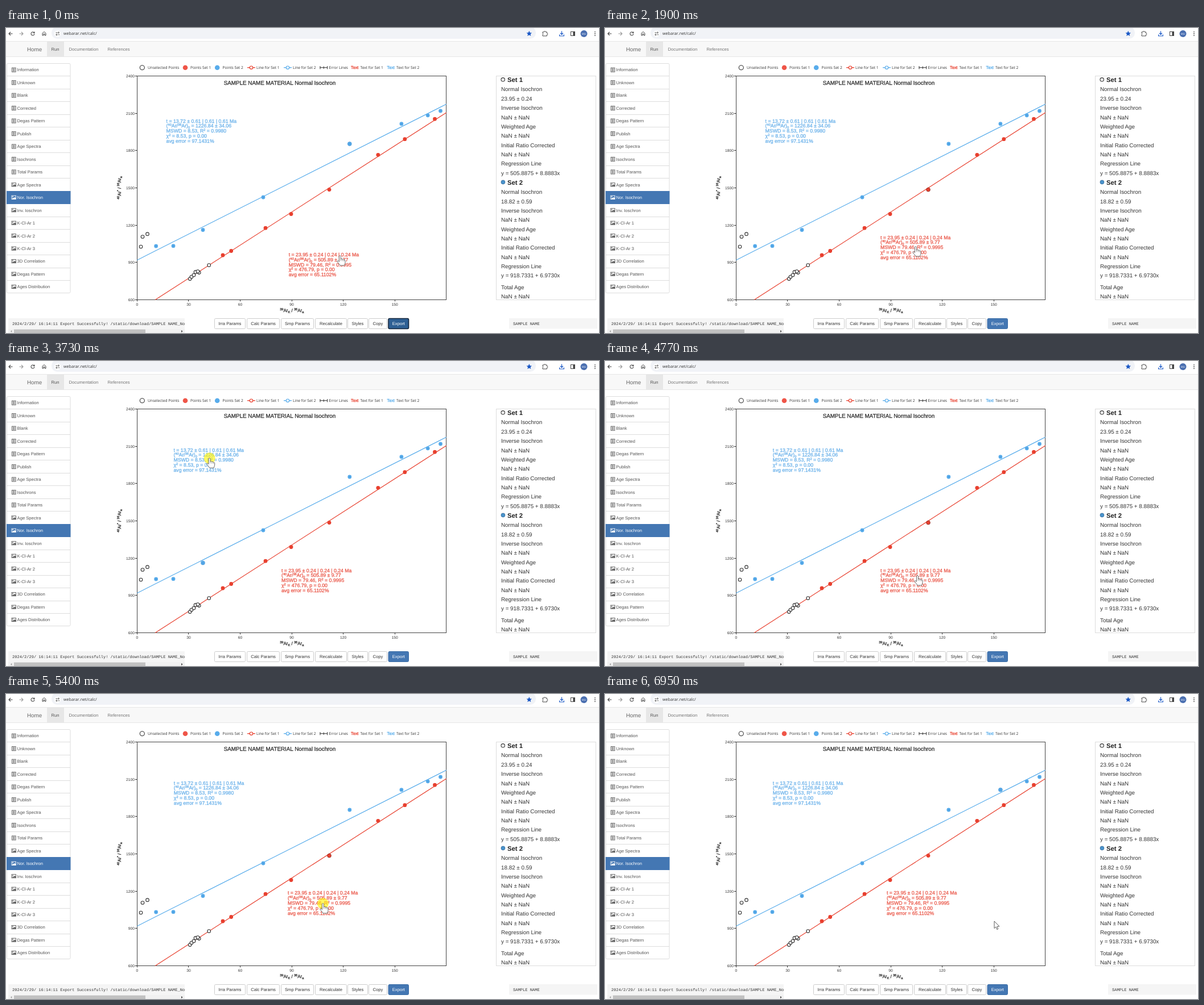
These frames come from a looping animation (1042x537 px, 8 s). An HTML page:

```html
<!DOCTYPE html>
<html lang="en">
<head>
<meta charset="utf-8">
<title>Normal isochron</title>
<style>
html, body { margin: 0; width: 100%; height: 100%; overflow: hidden; background: #fff; }
svg { display: block; width: 1042px; height: 537px; font-family: "Liberation Sans", Arial, sans-serif; }
text { white-space: pre; text-rendering: geometricPrecision; }
.ui { font-family: "Open Sans", "Noto Sans", sans-serif; }
.mono { font-family: "Liberation Mono", monospace; }
</style>
</head>
<body>
<svg id="stage" viewBox="0 0 1042 537"></svg>
<script>
const RED = '#e8402f', BLUE = '#58aceb', INK = '#333';
const LOOP = 8000;

// {^x} raises, {_x} lowers
const rich = (s, small) => s.replace(/\{([\^_])(.+?)\}/g, (m, k, v) =>
  `<tspan font-size="${small}" baseline-shift="${k === '^' ? 2.7 : -1.5}">${v}</tspan>`);
const text = (x, y, s, size = 7.63, fill = INK, more = '') =>
  `<text x="${x}" y="${y + size * 0.355}" font-size="${size}" fill="${fill}" ${more}>${rich(s, 5.7)}</text>`;
const rect = (x, y, w, h, fill, stroke = 'none', more = '') =>
  `<rect x="${x}" y="${y}" width="${w}" height="${h}" fill="${fill}" stroke="${stroke}" ${more}/>`;
const path = (d, stroke = INK, w = 1, fill = 'none', more = '') =>
  `<path d="${d}" stroke="${stroke}" stroke-width="${w}" fill="${fill}" ${more}/>`;
const dot = (x, y, r, fill, stroke = 'none', w = 1, more = '') =>
  `<circle cx="${x}" cy="${y}" r="${r}" fill="${fill}" stroke="${stroke}" stroke-width="${w}" ${more}/>`;
const bold = c => `stroke="${c}" stroke-width=".3"`;
const mid = 'text-anchor="middle"';

function browserBar() {
  const c = '#474747';
  return rect(80, -2, 851, 21, '#f1f3f7', 'none', 'rx="10"') +
    path('M11.5 10H5M8 7L5 10L8 13', c, 1.1) +
    path('M23.5 10H30M27 7L30 10L27 13', '#999', 1.1) +
    path('M49.4 8.2A3 3 0 1 0 50 10.4M50 6.6V8.7H47.8', c, 1.1) +
    path('M64 9.2L67 6.6L70 9.2V13H68V10.5H66V13H64Z', c, 1) +
    dot(90.5, 10, 5.5, '#fff') +
    path('M87.5 8.2H90M92 11.8H94', c, 1) + dot(92.3, 8.2, 1.1, 'none', c, .9) + dot(89, 11.8, 1.1, 'none', c, .9) +
    text(101, 9.8, 'webarar.net/calc/', 7.2, '#333', 'class="ui"') +
    path('M919.3 5L920.7 8.2L924 8.5L921.5 10.7L922.3 14L919.3 12.2L916.3 14L917.1 10.7L914.6 8.5L917.9 8.2Z', 'none', 0, '#1a58c6') +
    path('M943 7H945.6A1.3 1.3 0 0 1 948.2 7H950.5V9.2A1.3 1.3 0 0 1 950.5 11.8V14H943V11.6A1.2 1.2 0 0 0 943 9.3Z', c, 1) +
    path('M976.5 5.5V11.2M974 9L976.5 11.5L979 9M972.6 11.5V14H980.4V11.5', '#1a58c6', 1.2) +
    rect(992.5, 6.5, 7, 7, '#fff', c) + rect(996.4, 6.5, 3.2, 7, c) +
    dot(1015.5, 10, 6, '#4a6fb0') + text(1015.5, 10, 'MU', 4.8, '#e9eefa', mid) +
    [6.8, 10, 13.2].map(y => dot(1035, y, .9, c)).join('');
}

function navBar() {
  return rect(-2, 23.5, 1046, 27, '#f8f8f8', '#e7e7e7') + rect(72, 24, 30, 26.5, '#e7e7e7') +
    text(37, 37.2, 'Home', 9.8, '#666') + text(79.5, 37.2, 'Run', 7.63, '#555') +
    text(110.5, 37.2, 'Documentation', 7.7, '#777') + text(178.5, 37.2, 'References', 7.63, '#777');
}

function sideMenu() {
  const names = ['Information', 'Unknown', 'Blank', 'Corrected', 'Degas Pattern', 'Publish', 'Age Spectra',
    'Isochrons', 'Total Params', 'Age Spectra', 'Nor. Isochron', 'Inv. Ioschron', 'K-Cl-Ar 1', 'K-Cl-Ar 2',
    'K-Cl-Ar 3', '3D Correlation', 'Degas Pattern', 'Ages Distribution'];
  const active = 10, midY = i => 73.7 + i * 22.47;
  let out = rect(1.5, 62.5, 111.5, 404, '#fff', '#ddd', 'rx="2"');
  for (let i = 1; i < names.length; i++) out += path(`M1.5 ${Math.round(midY(i) - 11.7) + .5}H113`, '#ddd');
  out += rect(1, 287, 112.5, 23, '#4477b3');
  names.forEach((name, i) => {
    const y = midY(i), c = i === active ? '#fff' : '#555';
    out += i < 9
      ? rect(10.5, y - 3.6, 6.6, 7.2, 'none', c, 'stroke-width=".9"') +
        path(`M12 ${y - 1.8}H16M12 ${y}H16M12 ${y + 1.8}H16M13 ${y - 3}V${y + 3}`, c, .7)
      : rect(10, y - 3.2, 7.4, 6.2, 'none', c, 'stroke-width=".9"') + dot(12, y - 1.3, .9, c) +
        path(`M10.5 ${y + 2.5}L12.6 ${y + .3}L13.6 ${y + 1.2}L15.4 ${y - 1}L17 ${y + 1}V${y + 2.5}Z`, 'none', 0, c);
    out += text(19.6, y, name, 7.63, c);
  });
  return out;
}

function legend() {
  const item = (x, s) => text(x, 69.8, s, 6.65, INK, 'class="ui"');
  const lineKey = (x, c) => path(`M${x} 69.7h14`, c, 1.3) + dot(x + 7, 69.7, 2.7, '#fff', c, 1.2);
  return dot(239.3, 69.7, 4, '#fff', '#333', 1.1) + item(249, 'Unselected Points') +
    dot(315, 69.7, 4.3, '#ef5548') + item(324, 'Points Set 1') +
    dot(371.2, 69.7, 4.3, BLUE) + item(380.5, 'Points Set 2') +
    lineKey(424, RED) + item(440, 'Line for Set 1') +
    lineKey(488, BLUE) + item(504, 'Line for Set 2') +
    path('M551.5 69.7h13.5M552 67v5.4M564.6 67v5.4M558.3 67.5v4.4', '#333', 1) + item(567.5, 'Error Lines') +
    text(606, 69.6, 'Text', 7.3, RED, bold(RED)) + item(622.5, 'Text for Set 1') +
    text(669.5, 69.6, 'Text', 7.3, BLUE, bold(BLUE)) + item(686, 'Text for Set 2');
}

const open = [[237, 385], [240, 367.5], [248.5, 362.7], [323.2, 441.6], [326, 438], [330, 435], [333, 429.7],
  [339.2, 430.6], [337, 428.5], [356.7, 417.5]];
const red = [[381, 400], [395.7, 392.5], [456, 352.2], [501, 327.5], [568, 284.6], [653.8, 223.3], [700.8, 195.7], [753.5, 160.2]];
const blue = [[263.6, 384], [294, 383.7], [346, 355.5], [452, 298], [603.8, 204], [694.9, 168.7], [741.2, 153.8], [763.5, 146]];

function chart() {
  const px = v => 230.3 + v * 3.0195, py = v => 478.4 - (v - 600) * .2188;
  const rule = (a, b, from, c) => path(`M${px(from)} ${py(a + b * from)}L${px(180)} ${py(a + b * 180)}`, c, 1.2);
  const title = mid + ' ' + bold(INK);
  let out = rect(230.5, 84.5, 543, 394, '#fff', '#444');
  for (let v = 600; v <= 2400; v += 300) {
    const y = py(v);
    out += path(`M227 ${Math.floor(y) + .5}h3`, '#333') + text(226, y + .2, String(v), 6.7, INK, 'text-anchor="end"');
  }
  for (let v = 0; v <= 150; v += 30) {
    const x = px(v);
    out += path(`M${Math.floor(x) + .5} 478v3.5`, '#333') + text(x, 487, String(v), 6.7, INK, mid);
  }
  out += text(481, 97, 'SAMPLE NAME MATERIAL Normal Isochron', 9.84, INK, title) +
    text(502.3, 496.7, '{^39}Ar{_K} / {^36}Ar{_a}', 8, INK, title) +
    `<g transform="translate(199 281.5) rotate(-90)">${text(0, 0, '{^40}Ar{^*} / {^36}Ar{_a}', 8, INK, title)}</g>`;
  out += rule(918.7331, 6.973, 0, BLUE) + rule(505.8875, 8.8883, 10.59, RED);
  out += open.map(p => dot(...p, 2.8, '#fff', '#333', 1.1)).join('');
  out += blue.map(p => dot(...p, 3.4, BLUE, 'none', .8, 'class="pt"') + dot(...p, 1, '#4594d8')).join('');
  out += red.map(p => dot(...p, 3.4, RED, 'none', .8, 'class="pt"')).join('');
  return out;
}

const note = (id, c, lines) => `<g id="${id}">` +
  lines.map((s, i) => text(0, i * 8.78, s, 8.72, c, bold(c))).join('') + '</g>';

function resultPanel() {
  const set = (a, b) => ['Normal Isochron', a, 'Inverse Isochron', 'NaN ± NaN', 'Weighted Age', 'NaN ± NaN',
    'Initial Ratio Corrected', 'NaN ± NaN', 'Regression Line', b];
  const block = (y, title, rows) => text(881, y, title, 11.3, '#222', 'font-weight="bold"') +
    rows.map((s, i) => text(870, y + 17.2 + i * 16.35, s, 9.84)).join('');
  return rect(861.5, 84.5, 175, 394, '#fff', '#ddd') +
    dot(873.2, 90.8, 3.2, '#fff', '#333', 1.1) +
    block(90.8, 'Set 1', set('23.95 ± 0.24', 'y = 505.8875 + 8.8883x')) +
    dot(873.4, 271.4, 3.4, BLUE, '#2d5f8c', .9) + dot(873.4, 271.4, 1.6, 'none', '#2d5f8c', .7) +
    block(271.5, 'Set 2', set('18.82 ± 0.59', 'y = 918.7331 + 6.9730x')) +
    text(870, 457, 'Total Age', 9.84) + text(870, 473, 'NaN ± NaN', 9.84);
}

function footer() {
  const buttons = [[366.5, 54, 'Irra Params'], [423.5, 57, 'Calc Params'], [483.5, 57, 'Smp Params'],
    [543.5, 55, 'Recalculate'], [600.5, 35, 'Styles'], [637.5, 32, 'Copy']];
  return rect(4, 511, 310, 27, '#f5f5f5') +
    '<svg x="4" y="511" width="310" height="19" viewBox="4 511 310 19" style="width:310px;height:19px">' +
    text(11, 520.3, '2024/2/29/ 16:14:11 Export Successfully! /static/download/SAMPLE NAME_Normal', 7.02, INK, 'class="mono"') + '</svg>' +
    rect(4, 530, 310, 8, '#f1f1f1') + rect(14, 530.7, 231, 6.3, '#c1c1c1') +
    path('M10.3 532L8 534L10.3 536Z', 'none', 0, '#999') + path('M308 532L310.6 534L308 536Z', 'none', 0, '#444') +
    rect(884, 511, 155, 18.5, '#f5f5f5') + text(891, 520.3, 'SAMPLE NAME', 7.1, INK, 'class="mono"') +
    buttons.map(([x, w, s]) => rect(x, 511.5, w, 18, '#fff', '#ccc', 'rx="2"') +
      text(x + w / 2, 520.6, s, 7.63, INK, mid)).join('') +
    rect(672, 511.5, 35.5, 18, '#4477b3', '#3c6da6', 'rx="2" id="export"') +
    text(689.8, 520.6, 'Export', 7.63, '#fff', mid);
}

const hand = 'M-1.6 1.2C-1.6-.8 1.4-.8 1.4 1.2V6C2 5 4 5 4.2 6.6C5 5.6 6.6 6 6.8 7.4C7.8 6.8 9 7.4 9 8.6V12' +
  'C9 14 7.8 15 7.5 17H-.2C-.8 14.8-3.4 12.8-4.8 10.4C-5.4 9-3.8 8.2-2.8 9.2L-1.6 10.4Z';
const arrow = 'M0 0V12.6L2.8 10L4.8 14.6L6.8 13.7L4.9 9.3L8.9 9.1Z';

const stage = document.getElementById('stage');
stage.innerHTML = rect(0, 0, 1042, 537, '#fff') + browserBar() + navBar() + sideMenu() + legend() + chart() +
  note('blueNote', '#6cb2ea', ['t = 13.72 ± 0.61 | 0.61 | 0.61 Ma', '({^40}Ar/{^36}Ar){_0} = 1226.84 ± 34.06',
    'MSWD = 8.53, R{^2} = 0.9980', 'χ{^2} = 8.53, p = 0.00', 'avg error = 97.1431%']) +
  note('redNote', '#ea5a4c', ['t = 23.95 ± 0.24 | 0.24 | 0.24 Ma', '({^40}Ar/{^36}Ar){_0} = 505.89 ± 9.77',
    'MSWD = 79.46, R{^2} = 0.9995', 'χ{^2} = 476.79, p = 0.00', 'avg error = 65.1102%']) +
  resultPanel() + footer() +
  '<g id="mouse">' + dot(0, 0, 10, '#fff200', 'none', 1, 'id="press" fill-opacity=".62"') +
  path(hand, '#444', .8, '#fff', 'id="hand" stroke-linejoin="round"') +
  path('M1.4 6V9M4.2 7V9.4M6.8 8V9.8', '#666', .7, 'none', 'id="creases"') +
  path(arrow, '#333', .8, '#fff', 'id="arrow"') + '</g>';

// [time, x, y]
const mouseKeys = [[30, 587, 401], [290, 545, 408], [720, 545, 408], [930, 546, 393], [1140, 546, 385],
  [2070, 546, 385], [2650, 345, 178], [3160, 345, 178], [3330, 352, 174], [3500, 352, 174], [3770, 358, 171],
  [4140, 358, 171], [4770, 549, 378], [4930, 546, 386], [4970, 546, 386], [5400, 557, 369],
  [5720, 557, 369], [6410, 673, 399], [6580, 673, 399], [6950, 684, 400]];
const redKeys = [[720, 496.7, 399], [930, 484, 383.7], [1140, 484, 368.4], [4970, 484, 368.4], [5400, 494.9, 350.3]];
const blueKeys = [[3160, 281.6, 163.4], [3330, 288, 160], [3500, 288, 160], [3770, 294.8, 156.4]];
const presses = [[720, 1900], [3020, 4140], [4930, 5720]];

function at(keys, t) {
  const i = keys.findIndex(k => k[0] > t);
  if (i === 0) return keys[0].slice(1);
  if (i < 0) return keys[keys.length - 1].slice(1);
  const a = keys[i - 1], b = keys[i];
  const u = (t - a[0]) / (b[0] - a[0]), e = u * u * (3 - 2 * u);
  return [a[1] + (b[1] - a[1]) * e, a[2] + (b[2] - a[2]) * e];
}

const $ = id => document.getElementById(id);
const place = (id, p) => $(id).setAttribute('transform', `translate(${p[0].toFixed(2)} ${p[1].toFixed(2)})`);
const show = (id, on) => $(id).setAttribute('visibility', on ? 'visible' : 'hidden');
const over = (m, n) => m[0] > n[0] - 2 && m[0] < n[0] + 126 && m[1] > n[1] - 5 && m[1] < n[1] + 41;
const pts = [...document.querySelectorAll('.pt')];
const ptX = pts.map(p => +p.getAttribute('cx'));

function draw(t) {
  const m = at(mouseKeys, t), r = at(redKeys, t), b = at(blueKeys, t);
  place('mouse', m);
  place('redNote', r);
  place('blueNote', b);
  const down = presses.some(([s, e]) => t >= s && t < e);
  const grab = down || over(m, r) || over(m, b);
  show('press', down);
  show('hand', grab);
  show('creases', grab);
  show('arrow', !grab);
  // the point nearest in x is emphasised
  const gaps = ptX.map(x => Math.abs(x - m[0])), near = gaps.indexOf(Math.min(...gaps));
  pts.forEach((p, i) => p.setAttribute('stroke', i !== near ? 'none' : i < blue.length ? '#4a96d6' : '#8c2a20'));
  const focus = t < 750;
  $('export').setAttribute('fill', focus ? '#2f6094' : '#4477b3');
  $('export').setAttribute('stroke', focus ? '#14263c' : '#3c6da6');
  $('export').setAttribute('stroke-width', focus ? 1.6 : 1);
}

function tick() {
  draw(performance.now() % LOOP);
  requestAnimationFrame(tick);
}
tick();
</script>
</body>
</html>
```
